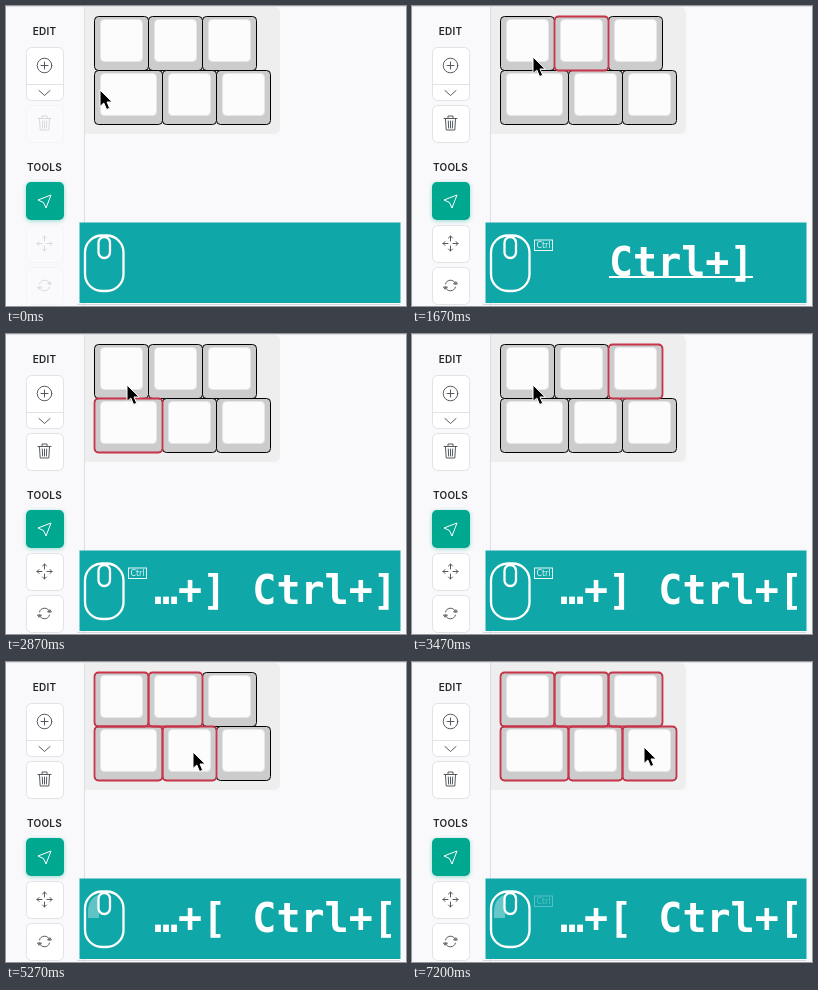
Write an HTML page that moves like this. It is 400x300 px and loops after 7270 ms.

```html
<!DOCTYPE html>
<html lang="en">
<head>
<meta charset="utf-8">
<title>Key selection</title>
<style>
  html, body { margin: 0; width: 100%; height: 100%; overflow: hidden; background: #f9f9fc; }
  svg { display: block; width: 400px; height: 300px; }
  .head { font: 600 10px Inter, sans-serif; letter-spacing: .2px; text-anchor: middle; fill: #212529; }
  .btn { fill: #fff; stroke: #e1e3e7; }
  .icon { fill: none; stroke: #555a60; stroke-linecap: round; stroke-linejoin: round; }
  .active { fill: #00a88f; filter: drop-shadow(0 1px 2px #00a88f66); }
  .line { fill: none; stroke: #fff; stroke-width: 2.3; }
  #typed { font: bold 40px "DejaVu Sans Mono", monospace; word-spacing: 2px; fill: #fff; }
  #ctrl text { font: 8px "DejaVu Sans", sans-serif; fill: #fff; text-anchor: middle; }
</style>
</head>
<body>
<svg viewBox="0 0 400 300">
  <path d="M0 .5H400M78.5 0V300" stroke="#dcdee2"/>
  <path d="M79 1H268a6 6 0 0 1 6 6V122a6 6 0 0 1-6 6H79Z" fill="#eee"/>

  <text class="head" x="38.5" y="29">EDIT</text>
  <rect class="btn" x="20.5" y="41.5" width="37" height="53" rx="5"/>
  <path d="M20.5 78.5h37" stroke="#e1e3e7"/>
  <g class="icon">
    <circle cx="38.5" cy="59.5" r="7.3"/>
    <path d="M38.5 56v7M35 59.5h7M33 84.5l5.5 5 5.5-5"/>
  </g>
  <text class="head" x="38.5" y="165">TOOLS</text>
  <rect class="active" x="20" y="176" width="38" height="38" rx="5"/>
  <path d="M45 189l-5 13-2.5-5.5-5.5-2.5Z" fill="none" stroke="#fff" stroke-linejoin="round"/>
  <g id="tools">
    <rect class="btn" x="20.5" y="99.5" width="37" height="37" rx="5"/>
    <rect class="btn" x="20.5" y="219.5" width="37" height="37" rx="5"/>
    <rect class="btn" x="20.5" y="261.5" width="37" height="37" rx="5"/>
    <g class="icon">
      <path d="M32 112.5h13M36 112v-2h5v2M33.5 113l.7 11h8.6l.7-11M36.3 115l.3 7M38.5 115v7M40.7 115l-.3 7"/>
      <path d="M38.5 235v-5M38.5 240v5M36 237.5h-5M41 237.5h5M36.5 232l2-2 2 2M36.5 243l2 2 2-2M33 235.5l-2 2 2 2M44 235.5l2 2-2 2"/>
      <path d="M33.5 278a5.2 5.2 0 0 1 10 0M43.5 281a5.2 5.2 0 0 1-10 0M42 278h3.5l-1.5-2ZM35 281h-3.500l1.500 2Z"/>
    </g>
  </g>

  <g id="keys"></g>
  <g id="marks" fill="none" stroke="#c8344a" stroke-width="1.8"></g>

  <path d="M71 298.5H394" stroke="#d5d8dc"/>
  <rect x="73.5" y="216.5" width="321" height="80.5" fill="#10a7a9"/>
  <path id="press" d="M82 256V250C82 240 87 234 93 233V256Z" fill="#fff"/>
  <rect class="line" x="79" y="229.5" width="38.5" height="55.5" rx="17"/>
  <rect x="92.5" y="231" width="11.500" height="21" rx="5.7" fill="#10a7a9" stroke="#fff" stroke-width="2.3"/>
  <g id="ctrl">
    <rect x="122.5" y="234" width="18" height="10.5" fill="none" stroke="#fff"/>
    <text x="131.5" y="242.3">Ctrl</text>
  </g>
  <text id="typed" y="270"></text>
  <path id="under" d="M197 271H341" stroke="#fff" stroke-width="2"/>

  <path id="arrow" d="M0 0V16.5L3.8 13 6.6 19.5 9.7 18.2 7 12H12.2Z" stroke="#fff" stroke-linejoin="round"/>
  <g id="cross">
    <path d="M-10 0H10M0-10V10" stroke="#fff" stroke-width="4"/>
    <path d="M-9 0H9M0-9V9" stroke="#000" stroke-width="2"/>
  </g>
</svg>
<script>
const LOOP = 7270, CLICK = 600, DRAG = 4230, DROP = 5060, PICK = [5700, 6900];
const UNIT = 54, NEXT = 670, BACK = 520;
const $ = id => document.getElementById(id);
const clamp = (v, lo, hi) => Math.min(hi, Math.max(lo, v));
const show = (el, on) => el.style.display = on ? '' : 'none';

// Two rows of three; the lower row starts with a wide key
const keys = Array.from({ length: 6 }, (_, i) => {
  const col = i % 3, row = (i - col) / 3, wide = 14 * row;
  return [88.5 + col * UNIT + (col && wide), 10.5 + row * UNIT, UNIT + (col ? 0 : wide)];
});
const box = (x, y, w, h, attrs = '') =>
  `<rect x="${x}" y="${y}" width="${w}" height="${h}" rx="4" ${attrs}/>`;

$('keys').innerHTML = keys.map(([x, y, w]) =>
  box(x, y, w, UNIT, 'fill="#ccc" stroke="#000"') +
  box(x + 6, y + 3, w - 12, 42, 'fill="#fcfcfc" stroke="#e6e6e6"')).join('');
$('marks').innerHTML = keys.map(([x, y, w]) => box(x, y, w, UNIT)).join('');
const marks = [...$('marks').children];

// 1 while held, then fading to 0
const held = (t, on, off, fade) => t < on ? 0 : clamp(1 - (t - off) / fade, 0, 1);

function glide(t, from, to) {
  const u = clamp((t - from) / (to - from), 0, 1);
  return u * u * (3 - 2 * u);
}

function pointer(t) {
  const a = glide(t, 70, 270), b = glide(t, DRAG + 40, DROP);
  const c = glide(t, DROP + 240, PICK[0] - 20), d = glide(t, PICK[0] + 400, PICK[1] - 50);
  return [94 + 27 * a + 66 * b + 29 * c + 16 * d, 84 - 33 * a + 39 * b - 51 * c + 46 * d];
}

function draw(t) {
  const ahead = clamp(Math.floor(t / NEXT) - 1, 0, 3);
  const back = clamp(Math.floor((t - 4 * NEXT) / BACK), 0, 2);
  const chosen = i => t < DRAG
    ? t >= CLICK && i === ahead - back
    : t >= (i % 3 < 2 ? DROP : PICK[i < 3 ? 0 : 1]);
  marks.forEach((m, i) => show(m, chosen(i)));

  const typed = ']'.repeat(ahead) + '['.repeat(back), many = typed.length > 1;
  $('typed').textContent = (many ? `…+${typed.at(-2)} ` : '') + (typed && `Ctrl+${typed.at(-1)}`);
  $('typed').setAttribute('x', many ? 148 : 197);
  show($('under'), typed.length === 1);

  const tap = on => held(t, on, on + 100, 350);
  $('press').style.opacity = .85 * Math.max(held(t, DRAG, DROP, 350), ...[CLICK, ...PICK].map(tap));
  $('ctrl').style.opacity = .9 * Math.max(held(t, 1300, 4050, 300), held(t, DROP + 540, 7000, 300));
  $('tools').style.opacity = .2 + .8 * Math.max(held(t, CLICK, DRAG + 70, 150), held(t, DROP, LOOP, 1));

  const dragging = t >= DRAG && t < DROP;
  for (const id of ['arrow', 'cross']) {
    $(id).setAttribute('transform', `translate(${pointer(t)})`);
    show($(id), dragging === (id === 'cross'));
  }
}

const start = performance.now();
function tick() {
  draw((performance.now() - start) % LOOP);
  requestAnimationFrame(tick);
}
tick();
</script>
</body>
</html>
```
